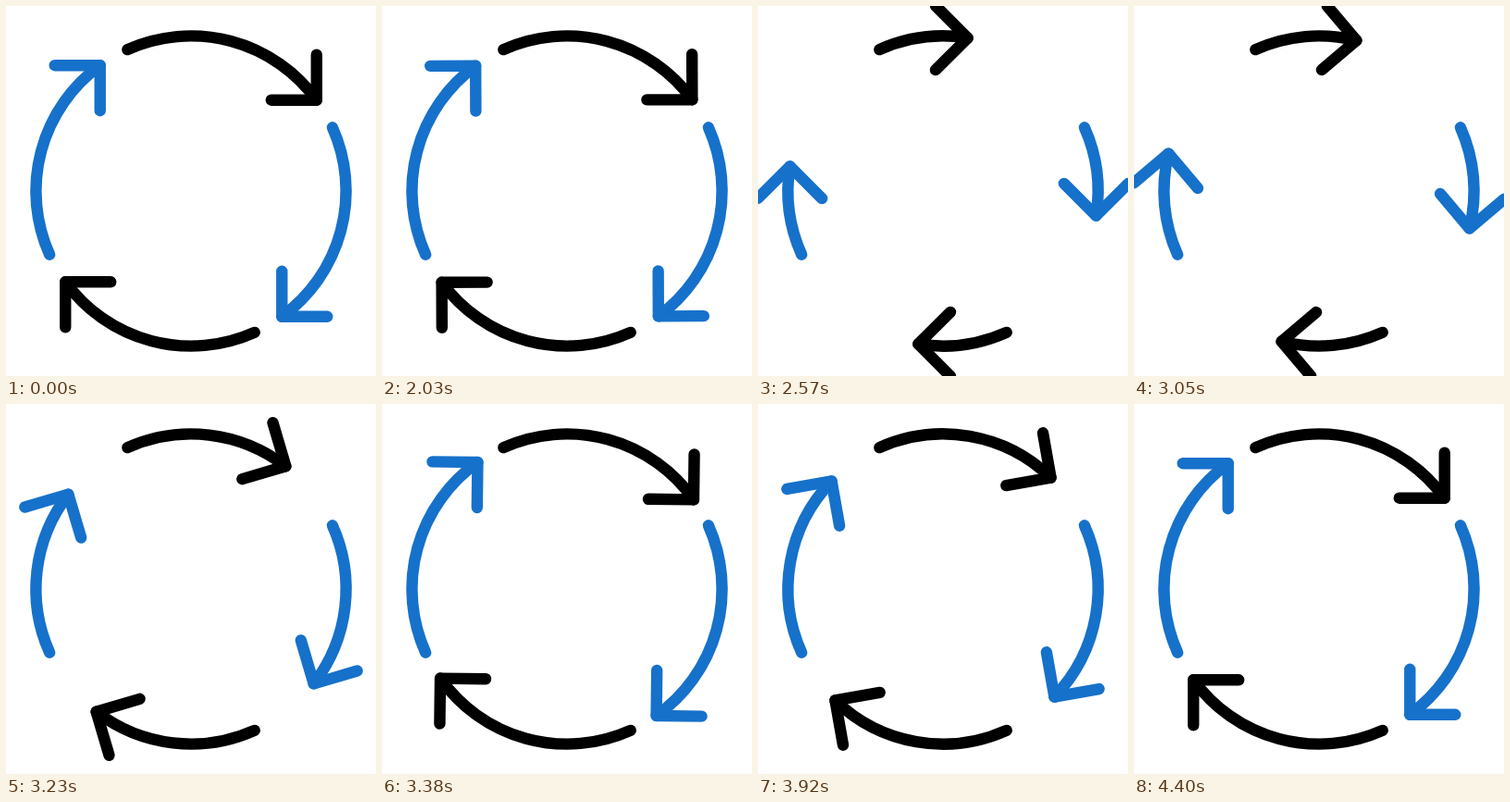
Animation of 400x400 px, one loop 4.43 s. Source, as an HTML page with a canvas:

```html
<!DOCTYPE html>
<html lang="en">
<head>
<meta charset="utf-8">
<title>Cycle arrows</title>
<style>
  html, body { margin: 0; width: 100%; height: 100%; overflow: hidden; background: #fff; }
  canvas { display: block; width: 400px; height: 400px; }
</style>
</head>
<body>
<canvas id="stage" width="400" height="400"></canvas>
<script>
const ctx = document.getElementById('stage').getContext('2d');
const LOOP = 4430, HOLD = 2000, STEP = 30;
const RADIUS = 167.6, ARM = 49;
const TAIL = -24.2, TIP = 54.1; // degrees clockwise from the top
const BLACK = '#000', BLUE = '#1671cb';

// [step, swing of the arrowhead in degrees]
const KEYS = [[0, 0], [27, -57], [51, 8], [65, -10.3], [80, 0]];

const rad = deg => deg * Math.PI / 180;
const ease = x => x * x * (3 - 2 * x);

function swingAt(step) {
  for (let i = 1; i < KEYS.length; i++) {
    const [s0, v0] = KEYS[i - 1], [s1, v1] = KEYS[i];
    if (step <= s1) return v0 + (v1 - v0) * ease((step - s0) / (s1 - s0));
  }
  return 0;
}

function drawArrow(turn, color, swing) {
  ctx.save();
  ctx.translate(200, 200);
  ctx.rotate(rad(turn));
  ctx.strokeStyle = color;

  ctx.beginPath();
  ctx.arc(0, 0, RADIUS, rad(TAIL - 90), rad(TIP + swing - 90));
  ctx.stroke();

  // The head turns rigidly about the centre of the ring.
  ctx.rotate(rad(swing));
  const x = RADIUS * Math.sin(rad(TIP));
  const y = -RADIUS * Math.cos(rad(TIP));
  ctx.beginPath();
  ctx.moveTo(x - ARM, y);
  ctx.lineTo(x, y);
  ctx.lineTo(x, y - ARM);
  ctx.stroke();
  ctx.restore();
}

function draw(time) {
  const step = Math.max(0, Math.floor((time % LOOP - HOLD) / STEP));
  const swing = swingAt(step);
  ctx.fillStyle = '#fff';
  ctx.fillRect(0, 0, 400, 400);
  ctx.lineWidth = 12.4;
  ctx.lineCap = ctx.lineJoin = 'round';
  for (let i = 0; i < 4; i++) drawArrow(i * 90, i % 2 ? BLUE : BLACK, swing);
}

const start = performance.now();
function tick() {
  draw(performance.now() - start);
  requestAnimationFrame(tick);
}
tick();
</script>
</body>
</html>
```
